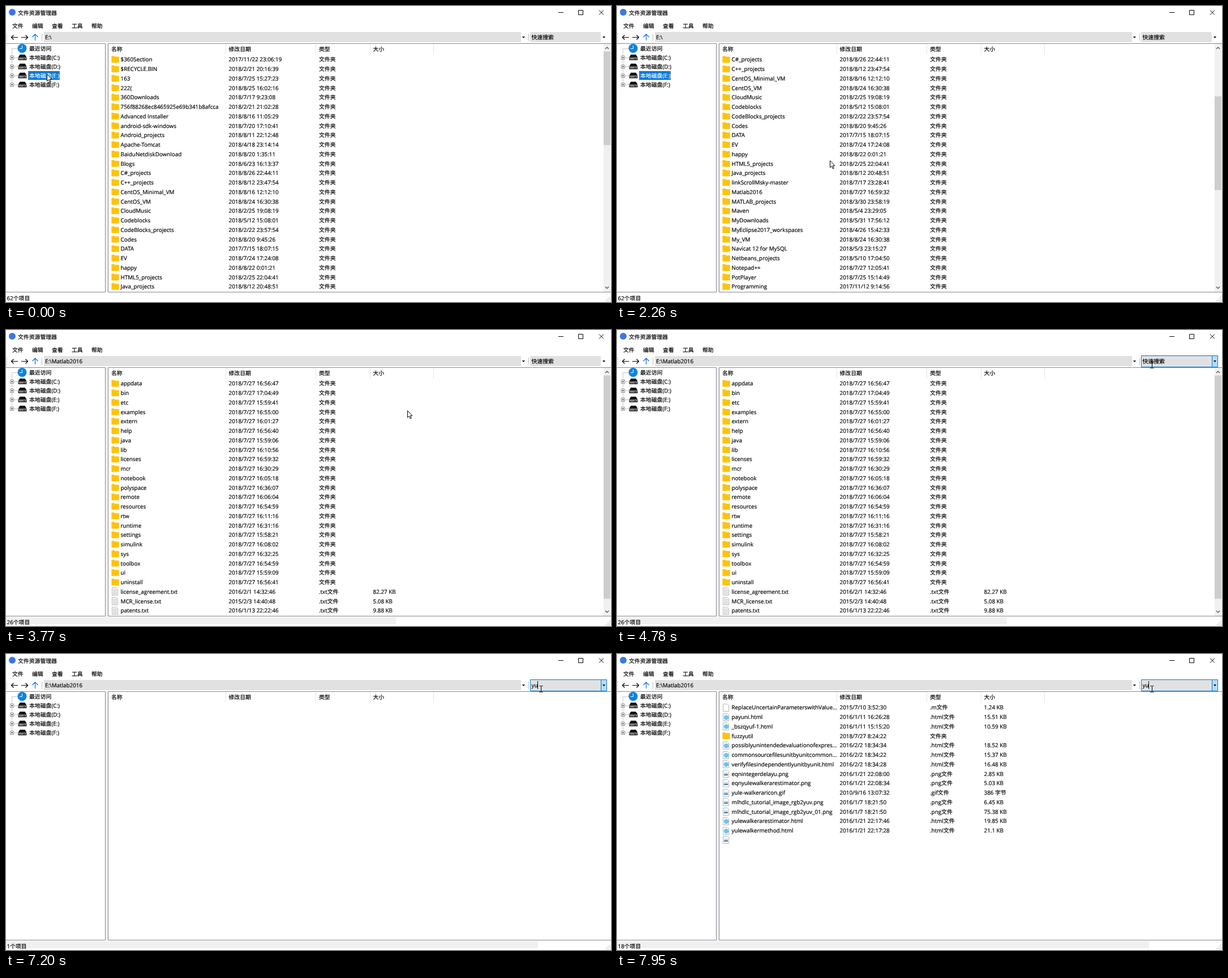
Recreate the animation shown at these times as an HTML page with a canvas. Size 1069 by 524 pixels, loop 8 s.

```html
<!DOCTYPE html>
<html lang="zh-CN">
<head>
<meta charset="utf-8">
<title>文件资源管理器</title>
<style>
html, body { margin: 0; width: 100%; height: 100%; overflow: hidden; background: #fff; }
canvas { display: block; }
</style>
</head>
<body>
<canvas id="stage" width="1069" height="524"></canvas>
<script>
const ctx = document.getElementById('stage').getContext('2d');
const LOOP = 8000, ROW = 16.75, VISIBLE = 25;
const BLUE = '#0078d7', EDGE = '#828790';

// Each line: name | date | size | extension (when the name does not show it)
const parse = text => text.trim().split('\n').map(line => {
  const [name, date, size, ext] = line.split('|');
  return { name, date, size, ext: ext || (size ? name.split('.').pop() : '') };
});

const driveRows = parse(`
$360Section|2017/11/22 23:06:19
$RECYCLE.BIN|2018/2/21 20:16:39
163|2018/7/25 15:27:23
222(|2018/8/25 16:02:16
360Downloads|2018/7/17 9:23:08
756f88268ec8465925e69b341b8afcca|2018/2/21 21:02:28
Advanced Installer|2018/8/16 11:05:29
android-sdk-windows|2018/7/20 17:10:41
Android_projects|2018/8/11 22:12:48
Apache-Tomcat|2018/4/18 23:14:14
BaiduNetdiskDownload|2018/8/20 1:35:11
Blogs|2018/6/23 16:13:37
C#_projects|2018/8/26 22:44:11
C++_projects|2018/8/12 23:47:54
CentOS_Minimal_VM|2018/8/16 12:12:10
CentOS_VM|2018/8/24 16:30:38
CloudMusic|2018/2/25 19:08:19
Codeblocks|2018/5/12 15:08:01
CodeBlocks_projects|2018/2/22 23:57:54
Codes|2018/8/20 9:45:26
DATA|2017/7/15 18:07:15
EV|2018/7/24 17:24:08
happy|2018/8/22 0:01:21
HTML5_projects|2018/2/25 22:04:41
Java_projects|2018/8/12 20:48:51
linkScrollMsky-master|2018/7/17 23:28:41
Matlab2016|2018/7/27 16:59:32
MATLAB_projects|2018/3/30 23:58:19
Maven|2018/5/4 23:29:05
MyDownloads|2018/5/31 17:56:12
MyEclipse2017_workspaces|2018/4/26 15:42:33
My_VM|2018/8/24 16:30:38
Navicat 12 for MySQL|2018/5/3 23:15:27
Netbeans_projects|2018/5/10 17:04:50
Notepad++|2018/7/27 12:05:41
PotPlayer|2018/7/25 15:14:49
Programming|2017/11/12 9:14:56`);

const folderRows = parse(`
appdata|2018/7/27 16:56:47
bin|2018/7/27 17:04:49
etc|2018/7/27 15:59:41
examples|2018/7/27 16:55:00
extern|2018/7/27 16:01:27
help|2018/7/27 16:56:40
java|2018/7/27 15:59:06
lib|2018/7/27 16:10:56
licenses|2018/7/27 16:59:32
mcr|2018/7/27 16:30:29
notebook|2018/7/27 16:05:18
polyspace|2018/7/27 16:36:07
remote|2018/7/27 16:06:04
resources|2018/7/27 16:54:59
rtw|2018/7/27 16:11:16
runtime|2018/7/27 16:31:16
settings|2018/7/27 15:58:21
simulink|2018/7/27 16:08:02
sys|2018/7/27 16:32:25
toolbox|2018/7/27 16:54:59
ui|2018/7/27 15:59:09
uninstall|2018/7/27 16:56:41
license_agreement.txt|2016/2/1 14:32:46|82.27 KB
MCR_license.txt|2015/2/3 14:40:48|5.08 KB
patents.txt|2016/1/13 22:22:46|9.88 KB`);

const resultRows = parse(`
ReplaceUncertainParameterswithValue...|2015/7/10 3:52:30|1.24 KB|m
payuni.html|2016/1/11 16:26:28|15.51 KB
_bszqyuf-1.html|2016/1/11 15:15:20|10.59 KB
fuzzyutil|2018/7/27 8:24:22
possiblyunintendedevaluationofexpres...|2016/2/2 18:34:34|18.52 KB|html
commonsourcefilesunitbyunitcommon...|2016/2/2 18:34:22|15.37 KB|html
verifyfilesindependentlyunitbyunit.html|2016/2/2 18:34:28|16.48 KB
eqnintegerdelayu.png|2016/1/21 22:08:00|2.85 KB
eqnyulewalkerarestimator.png|2016/1/21 22:08:34|5.03 KB
yule-walkeraricon.gif|2010/9/16 13:07:32|386 字节
mlhdlc_tutorial_image_rgb2yuv.png|2016/1/7 18:21:50|6.45 KB
mlhdlc_tutorial_image_rgb2yuv_01.png|2016/1/7 18:21:50|75.38 KB
yulewalkerarestimator.html|2016/1/21 22:17:46|19.85 KB
yulewalkermethod.html|2016/1/21 22:17:28|21.1 KB
|||png`);

// Mouse moves: start, end, from x, y, to x, y
const moves = [
  [0, 270, 72, 120, 516, 254],
  [1660, 2080, 516, 254, 376, 273],
  [2240, 2830, 376, 273, 301, 329],
  [3440, 3770, 301, 329, 709, 142],
  [3920, 4750, 709, 142, 945, 62]
];

function rect(x, y, w, h, color) {
  ctx.fillStyle = color;
  ctx.fillRect(x, y, w, h);
}
function frame(x, y, w, h, color) {
  ctx.lineWidth = 1;
  ctx.strokeStyle = color;
  ctx.strokeRect(x + .5, y + .5, w - 1, h - 1);
}
// The hairline outline gives the text the density of hinted screen type
function text(str, x, middle, color = '#000') {
  ctx.fillStyle = ctx.strokeStyle = color;
  ctx.lineWidth = .2;
  ctx.fillText(str, x, middle + 3.6);
  ctx.strokeText(str, x, middle + 3.6);
}
function disc(x, y, r, color) {
  ctx.fillStyle = color;
  ctx.beginPath();
  ctx.arc(x, y, r, 0, 7);
  ctx.fill();
}
function path(d, stroke, fill, x = 0, y = 0, width = 1) {
  const p = new Path2D(d);
  ctx.save();
  ctx.translate(x, y);
  ctx.lineWidth = width;
  if (fill) { ctx.fillStyle = fill; ctx.fill(p); }
  if (stroke) { ctx.strokeStyle = stroke; ctx.stroke(p); }
  ctx.restore();
}

function fileIcon(ext, y) {
  if (!ext) {
    path('M186.400 -6.200H191L192.500 -5H199.700V5.800H186.400Z', null, '#ffc30b', 0, y);
    return;
  }
  path('M187.500 -6.500H195L197.500 -4V6.500H187.500Z', '#b5b5b5', '#fff', 0, y);
  if (ext === 'txt') for (let i = -4; i < 6; i += 2) rect(189, y + i, 7, 1, '#c4c4c4');
  if (ext === 'html') disc(193, y + .5, 4.2, '#6cc4ea');
  if (ext === 'png' || ext === 'gif') {
    rect(189, y - 2, 7, 5, '#b5d5ee');
    rect(189, y + 1, 7, 2, '#4a7396');
  }
}

function drawTopBars(address) {
  disc(11, 11, 6, '#3b78e0');
  text('文件资源管理器', 21, 12);
  rect(976, 11, 9, 1, '#000');
  frame(1011, 7, 9, 9, '#000');
  path('M1048 7.500L1056 15.500M1056 7.500L1048 15.500', '#000');
  ['文件', '编辑', '查看', '工具', '帮助'].forEach((s, i) => text(s, 11 + i * 35, 35));

  for (let y = 49; y < 62; y += 3) rect(1, y, 1, 1, '#999');
  path('M21 55.500H9.500M13.500 51.500L9.500 55.500L13.500 59.500M27 55.500H38.500M34.500 51.500L38.500 55.500L34.500 59.500', '#000', null, 0, 0, 1.2);
  path('M51.500 61V50M46.500 55L51.500 50L56.500 55', '#0a6cf0', null, 0, 0, 1.2);
  rect(63, 49, 1, 13, '#bdbdbd');
  rect(67, 46, 843, 18, '#e1e1e1');
  text(address, 69, 55);
  path('M912 54H917L914.500 57Z', null, '#000');
  rect(923, 49, 1, 13, '#bdbdbd');
}

function drawSearch(t) {
  const hot = t >= 4560;
  rect(926, 46, 125, hot ? 19 : 18, '#e1e1e1');
  if (hot) {
    rect(1051, 45, 11, 21, t >= 4780 ? '#b8dbf5' : '#d5eafa');
    frame(926, 45, 136, 21, BLUE);
    rect(1051, 45, 1, 21, BLUE);
  }
  path('M1054 54H1059L1056.500 57Z', null, '#000');
  const typed = t < 4840 ? '快速搜索' : t < 5590 ? '' : t < 5710 ? 'y' : 'yu';
  text(typed, 928.5, 55);
  const since = t < 4840 ? -1 : t < 5590 ? t - 4840 : t < 5710 ? t - 5590 : t - 5710;
  if (since >= 0 && Math.floor(since / 530) % 2 === 0)
    rect(929 + typed.length * 5, 48, 1, 14, '#000');
}

function drawTree(selected) {
  rect(0, 66, 176, 441, '#fff');
  frame(-1, 66, 177, 441, EDGE);
  for (let y = 75; y < 140; y += 2) rect(10, y, 1, 1, '#909090');
  for (let x = 10; x < 21; x += 2) rect(x, 75, 1, 1, '#909090');
  disc(28.5, 75, 8, '#0a84e4');
  path('M28.500 70V75.500H24', '#fff');
  text('最近访问', 41, 75);
  [...'CDEF'].forEach((letter, i) => {
    const y = 91 + i * 16;
    for (let x = 14; x < 21; x += 2) rect(x, y, 1, 1, '#909090');
    rect(7, y - 3, 7, 7, '#fff');
    frame(7, y - 3, 7, 7, '#919191');
    rect(9, y, 3, 1, '#333');
    rect(10, y - 1, 1, 3, '#333');
    path('M24.500 -5H33.500L36.500 0H21.500Z', null, '#151515', 0, y);
    rect(21.5, y + .5, 15, 4.5, '#333');
    rect(23, y + 2, 8, 1, '#ddd');
    rect(33, y + 2, 2, 1, '#ddd');
    const on = selected && letter === 'E';
    if (on) {
      rect(39, y - 8, 56, 16, BLUE);
      ctx.setLineDash([1, 1]);
      frame(39, y - 8, 56, 16, '#ff8728');
      ctx.setLineDash([]);
    }
    text(`本地磁盘(${letter}:)`, 41, y, on ? '#fff' : '#000');
  });
}

function drawList(rows, first, total, selected) {
  rect(180, 66, 889, 441, '#fff');
  frame(180, 66, 890, 441, EDGE);
  [['名称', 186], ['修改日期', 393.5], ['类型', 553], ['大小', 648.5]].forEach(([s, x]) => text(s, x, 76.5));
  [388, 547, 643, 755].forEach(x => rect(x, 67, 1, 19, '#e5e5e5'));

  rows.slice(first, first + VISIBLE).forEach((row, i) => {
    const y = 94.8 + i * ROW, on = row.name === selected, color = on ? '#fff' : '#000';
    if (on) rect(202, Math.round(y - 8), 554, 16, BLUE);
    fileIcon(row.ext, row.ext ? Math.round(y) : y);
    if (!row.name) return;
    text(row.name, 202.5, y, color);
    text(row.date, 393.5, y, color);
    text(row.ext ? `.${row.ext}文件` : '文件夹', 553, y, color);
    text(row.size || '', 648.5, y, color);
  });

  if (rows.length < VISIBLE) return;
  rect(1056, 67, 12, 439, '#f0f0f0');
  rect(1056, 80.5 + 411 * first / total, 12, 411 * VISIBLE / total, '#cdcdcd');
  path('M1059 76L1062 73L1065 76M1059 497L1062 500L1065 497', '#505050', null, 0, 0, 1.3);
}

function drawStatus(count, shaded) {
  rect(0, 508, shaded, 13, '#f0f0f0');
  text(count + '个项目', 1.5, 517);
  for (let i = 0; i < 3; i++)
    for (let j = 0; j <= i; j++) rect(1066 - j * 3, 515 + i * 3, 1.5, 1.5, '#b5b5b5');
}

function drawMouse(t) {
  if (t >= 5620 && t < 7200) return;
  let [, , x, y] = moves[0];
  for (const [start, end, x0, y0, x1, y1] of moves) {
    if (t < start) break;
    const p = Math.min(1, (t - start) / (end - start)), e = p * p * (3 - 2 * p);
    x = x0 + (x1 - x0) * e;
    y = y0 + (y1 - y0) * e;
  }
  x = Math.round(x);
  y = Math.round(y);
  if (x > 926 && y < 67)
    path('M-2.500 -5.500H-.500L.5 -5L1.500 -5.500H3.500M.5 -5V5M-2.500 5.500H-.500L.5 5L1.500 5.500H3.500', '#000', null, x, y);
  else
    path('M.5 .8V13L3.400 10.400L5.400 15L7.300 14.200L5.300 9.800H9Z', '#000', '#fff', x, y);
}

function draw(t) {
  rect(0, 0, 1069, 524, '#fff');
  rect(176, 66, 4, 441, '#f0f0f0');
  ctx.font = '9.85px "Open Sans", "Noto Sans CJK SC", "Noto Sans CJK", sans-serif';
  ctx.textRendering = 'geometricPrecision';
  ctx.lineJoin = 'round';

  const opened = t >= 3040, searching = t >= 7200;
  const found = t < 7590 ? 1 + Math.floor((t - 7200) / 65) : 7 + Math.floor((t - 7590) / 32.5);
  drawTopBars(opened ? 'E:\\Matlab2016' : 'E:\\');
  drawSearch(t);
  drawTree(t < 2860);
  if (searching) drawList(t < 7670 ? [] : resultRows.slice(0, found - 3), 0, found);
  else if (opened) drawList(t < 3070 ? [] : folderRows, 0, 26);
  else {
    const notches = [670, 730, 1040, 1080].filter(at => t >= at).length;
    drawList(driveRows, notches * 3, 62, t >= 2860 ? 'Matlab2016' : null);
  }
  drawStatus(searching ? found : opened ? 26 : 62, searching ? 940 : opened ? 689 : 0);
  drawMouse(t);
}

const begin = performance.now();
function tick() {
  draw((performance.now() - begin) % LOOP);
  requestAnimationFrame(tick);
}
tick();
</script>
</body>
</html>
```
